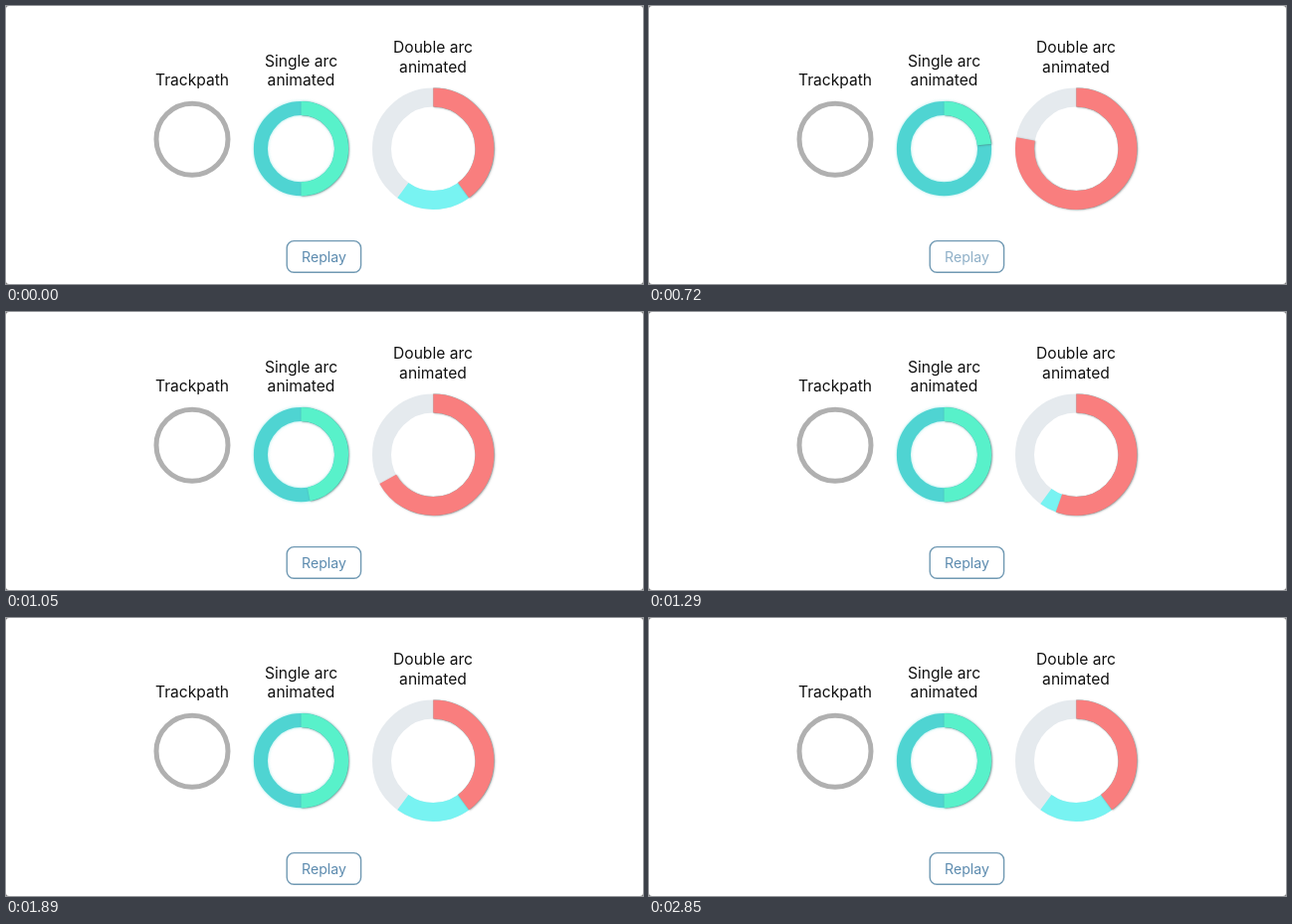
Write an HTML page with a canvas that moves like this. It is 640 px wide and 280 px high and loops after 2.88 s.

```html
<!DOCTYPE html>
<html lang="en">
<head>
<meta charset="utf-8">
<title>Ring animations</title>
<style>
  html, body { margin: 0; width: 100%; height: 100%; overflow: hidden; background: #fff; }
  canvas { display: block; width: 640px; height: 280px; }
</style>
</head>
<body>
<canvas id="stage"></canvas>
<script>
const W = 640, H = 280;
const LOOP = 2880, STEP = 30;
const PRESS = 450, RELEASE = 540, START = 504;
const SINGLE_MS = 680, DOUBLE_MS = 1386, TITLE_MS = 320;
const FONT = 'Inter, "Liberation Sans", sans-serif';

const canvas = document.getElementById('stage');
const ctx = canvas.getContext('2d');
const ratio = window.devicePixelRatio || 1;
canvas.width = W * ratio;
canvas.height = H * ratio;

const clamp = x => Math.min(1, Math.max(0, x));
const mix = (a, b, k) => a + (b - a) * k;

// Cubic bezier easing with control points (x1, 0) and (x2, 1).
function ease(x, x1, x2) {
  let lo = 0, hi = 1;
  for (let i = 0; i < 24; i++) {
    const t = (lo + hi) / 2, u = 1 - t;
    if (3 * x1 * t * u * u + 3 * x2 * t * t * u + t * t * t < x) lo = t;
    else hi = t;
  }
  return 3 * lo * lo - 2 * lo * lo * lo;
}
const easeOut = x => ease(clamp(x), 0, 0.58);
const easeInOut = x => ease(clamp(x), 0.42, 0.58);

function arc(ring, from, to, color, shadow) {
  if (to <= from) return;
  const turn = f => (f - 0.25) * 2 * Math.PI;
  ctx.save();
  if (shadow) {
    ctx.shadowColor = shadow.color;
    ctx.shadowBlur = shadow.blur * ratio;
    ctx.shadowOffsetX = shadow.dx * ratio;
    ctx.shadowOffsetY = shadow.dy * ratio;
  }
  ctx.beginPath();
  ctx.arc(ring.x, ring.y, ring.r, turn(from), turn(to));
  ctx.lineWidth = ring.w;
  ctx.strokeStyle = color;
  ctx.stroke();
  ctx.restore();
}

function label(text, x, y, size = 15.6, color = '#111') {
  ctx.font = `${size}px ${FONT}`;
  ctx.textAlign = 'center';
  ctx.fillStyle = color;
  ctx.fillText(text, x, y);
}

function box(x, y, w, h, r) {
  ctx.beginPath();
  ctx.roundRect(x, y, w, h, r);
}

const track = { x: 187, y: 134.2, r: 36, w: 5 };
const single = { x: 296.5, y: 143.7, r: 40.6, w: 14 };
const double = { x: 429.2, y: 143.8, r: 51.7, w: 19 };
const dark = { color: 'rgba(70,80,80,0.55)', blur: 2, dx: 0.8, dy: 0.5 };
const glow = { color: 'rgba(78,211,209,0.55)', blur: 3, dx: 0, dy: 0 };

function button(t) {
  const pressed = t >= PRESS && t < RELEASE;
  box(282.2, 236.6, 74.4, 31.6, 7);
  ctx.lineWidth = 1.4;
  ctx.strokeStyle = pressed ? '#e6e8ea' : '#7099b3';
  ctx.stroke();

  let alpha = 1;
  if (pressed) alpha = 0.2;
  else if (t >= RELEASE) alpha = mix(0.2, 1, easeInOut((t - RELEASE) / TITLE_MS));
  label('Replay', 319.5, 257.5, 14.1, pressed ? '#e0e3e6' : `rgba(91,138,174,${alpha})`);
}

function draw(t) {
  ctx.setTransform(ratio, 0, 0, ratio, 0, 0);
  ctx.fillStyle = '#777';
  ctx.fillRect(0, 0, W, H);
  box(0, 0, W, H, 3);
  ctx.fillStyle = '#fff';
  ctx.fill();

  const running = t >= RELEASE;
  const p = running ? easeOut((t - START) / SINGLE_MS) : 1;
  const q = running ? easeInOut((t - START) / DOUBLE_MS) : 1;

  label('Trackpath', 187, 80);
  arc(track, 0, 1, '#b0b0b0');

  label('Single arc', 296.5, 61);
  label('animated', 296.5, 80);
  arc(single, 0, 1, '#4fd4d2', glow);
  arc(single, 0, 0.5 * p, '#58f1ca', dark);

  label('Double arc', 429, 47.3);
  label('animated', 429, 66.5);
  arc(double, 0, 1, '#e5eaee');
  arc(double, 0, 0.6, '#78f3f2');
  arc(double, 0, mix(0.8, 0.4, q), '#f97e7e', dark);

  button(t);
}

let first = null;
function tick(now) {
  if (first === null) first = now;
  const t = (now - first) % LOOP;
  draw(Math.floor(t / STEP + 0.01) * STEP);
  requestAnimationFrame(tick);
}
draw(0);
requestAnimationFrame(tick);
</script>
</body>
</html>
```
